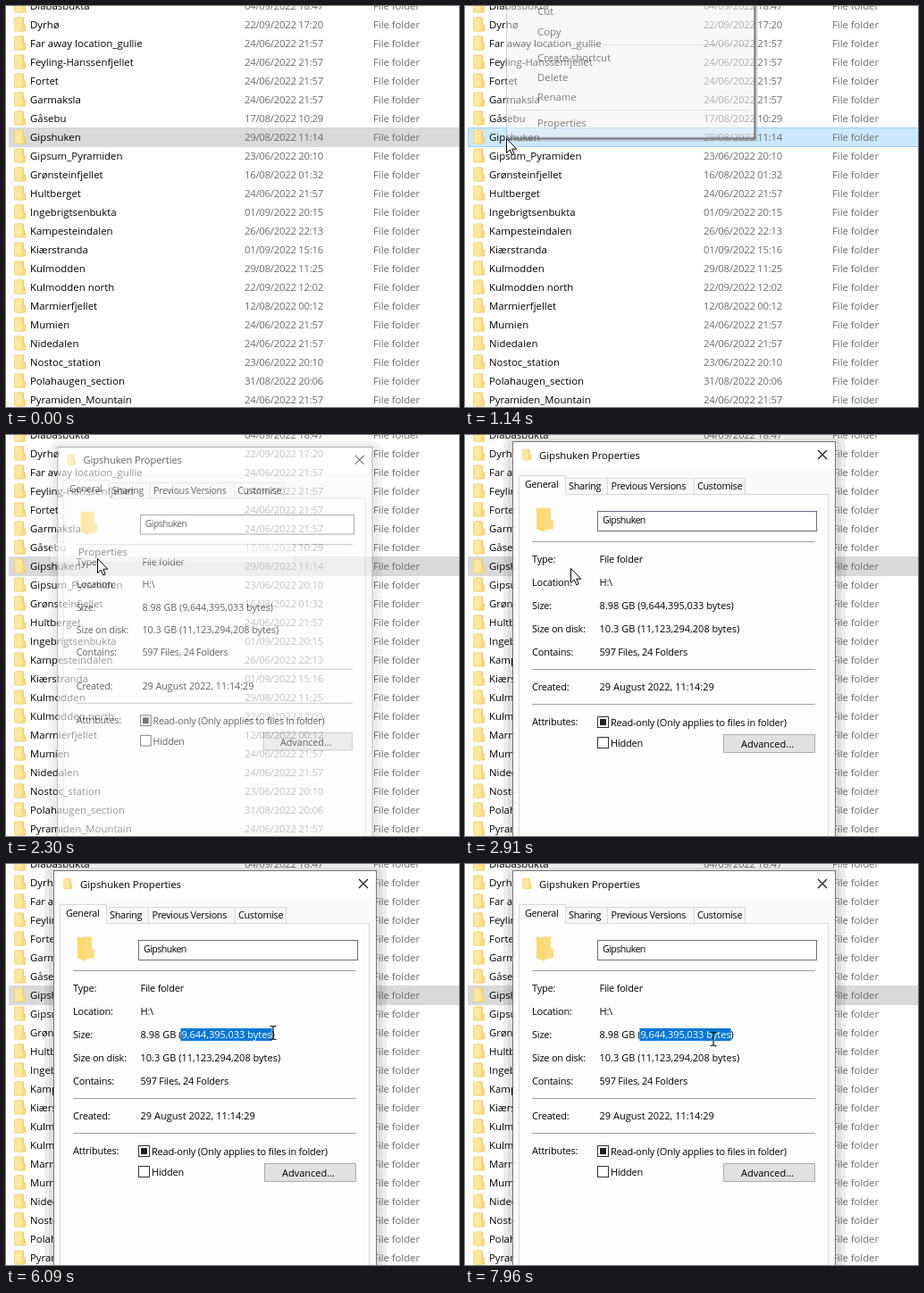
Recreate the animation shown at these times as an HTML page. Size 507 by 449 pixels, loop 8 s.

```html
<!DOCTYPE html>
<html lang="en">
<head>
<meta charset="utf-8">
<title>Folder properties</title>
<style>
html, body { margin: 0; width: 100%; height: 100%; overflow: hidden; background: #fff; }
svg { display: block; width: 507px; height: 449px; font: 11.4px "Open Sans", "Noto Sans", sans-serif; }
text { white-space: pre; }
.date { fill: #6d6d6d; letter-spacing: -.28px; }
.kind { fill: #6d6d6d; letter-spacing: -.06px; }
.title { letter-spacing: -.08px; }
.num { font-size: 11px; }
.word { font-size: 11px; letter-spacing: -.22px; }
.tab { font-size: 10.8px; letter-spacing: -.3px; }
.field { font-size: 10.6px; letter-spacing: -.55px; }
</style>
</head>
<body>
<svg id="stage" viewBox="0 0 507 449">
  <defs>
    <g id="folder">
      <path d="M13-7.500H19.500V-.5L21.500.5V7.500H13Z" fill="#fbdc83" stroke="#ecc75f" stroke-width=".8"/>
      <path d="M9.500-7.500H18.500V7.500H9.500Z" fill="#ffe79f" stroke="#f0d078" stroke-width=".8"/>
    </g>
    <clipPath id="picked"><rect id="pickClip" x="195.500" y="183" width="0" height="16"/></clipPath>
  </defs>
  <rect id="hover" x="3" width="510" height="21" fill="#e5f3ff"/>
  <rect id="chosen" x="3.5" y="136.5" width="510" height="21"/>
  <g id="list"></g>

  <g id="menuShadow" fill="none" stroke="#777" stroke-width="2">
    <path d="M324.5-5V148.5H50"/>
    <path d="M326.5-5V150.5H52" stroke="#aaa" opacity=".5"/>
  </g>
  <g id="menu">
    <rect x="46.5" y="-10" width="277" height="157" fill="#f2f2f2" stroke="#a0a0a0"/>
    <path d="M52 43.5H318M52 116.5H318" stroke="#c4c4c4"/>
  </g>

  <g id="dialog">
    <rect x="43" y="0" width="383" height="540" rx="12" opacity=".07"/>
    <rect x="48" y="4" width="373" height="540" rx="8" opacity=".06"/>
    <rect x="53.5" y="7.5" width="361" height="520" fill="#fff" stroke="#777"/>
    <rect x="54" y="37" width="360" height="480" fill="#fafafa"/>
    <g fill="#f7f7f7" stroke="#d9d9d9">
      <path d="M112.5 66V48.5H159.5V66M159.5 48.5H256.5V66M256.5 48.5H313.5V66"/>
      <path d="M60.5 500V45.5H112.5V66.5H406.5V500" fill="#fdfdfd"/>
    </g>
    <use href="#folder" transform="translate(57.500 22) scale(.76)"/>
    <path d="M395 17l10 10M405 17l-10 10" stroke="#111" stroke-width="1.1"/>
    <path d="M84 81.500H96V94L99 96V105L89 107Z" fill="#fbdd86"/>
    <path d="M80 81L89 85V109L80 105Z" fill="#ffd970"/>
    <rect x="148.500" y="85.5" width="245" height="22" fill="#fff" stroke="#6f6f7a"/>
    <path d="M75 119.500H392M75 262.500H392M75 301.500H392" stroke="#a0a0a0"/>
    <g fill="#fff" stroke="#333">
      <rect x="148.500" y="315.500" width="12" height="12"/>
      <rect x="148.500" y="338.500" width="12" height="12"/>
    </g>
    <rect x="151" y="318" width="7" height="7" fill="#222"/>
    <rect x="289.500" y="335.500" width="102" height="20" fill="#e1e1e1" stroke="#adadad"/>
  </g>

  <rect id="pick" x="195.500" y="184" height="14" fill="#0078d7"/>
  <g id="pickText" clip-path="url(#picked)" fill="#fff"></g>
  <g id="item"><rect x="50" y="121" width="271" height="21" fill="#fff"/></g>

  <circle id="ring" r="10" fill="none" stroke="#111" stroke-width="1.3"/>
  <path id="arrow" d="M.5.5V16.5L4.200 13 6.800 18.800 9.200 17.800 6.700 12.200H11.800Z" fill="#fff" stroke="#000"/>
  <path id="beam" d="M-3.500-7.500H-1.200L0-6.500 1.200-7.500H3.500M0-6.500V6.500M-3.500 7.500H-1.200L0 6.500 1.200 7.500H3.500" fill="none" stroke="#111" stroke-width="1.2"/>
</svg>
<script>
const $ = id => document.getElementById(id);

function add(parent, tag, attrs, content) {
  const el = document.createElementNS('http://www.w3.org/2000/svg', tag);
  for (const key in attrs) el.setAttribute(key, attrs[key]);
  if (content) el.textContent = content;
  return $(parent).appendChild(el);
}
// y is the middle of the line of text
const write = (parent, x, y, content, cls = '') =>
  add(parent, 'text', { x, y: y + 4.2, class: cls }, content);

const rows = `Diabasbukta|04/09/2022 18:47
Dyrhø|22/09/2022 17:20
Far away location_gullie|24/06/2022 21:57
Feyling-Hanssenfjellet|24/06/2022 21:57
Fortet|24/06/2022 21:57
Garmaksla|24/06/2022 21:57
Gåsebu|17/08/2022 10:29
Gipshuken|29/08/2022 11:14
Gipsum_Pyramiden|23/06/2022 20:10
Grønsteinfjellet|16/08/2022 01:32
Hultberget|24/06/2022 21:57
Ingebrigtsenbukta|01/09/2022 20:15
Kampesteindalen|26/06/2022 22:13
Kiærstranda|01/09/2022 15:16
Kulmodden|29/08/2022 11:25
Kulmodden north|22/09/2022 12:02
Marmierfjellet|12/08/2022 00:12
Mumien|24/06/2022 21:57
Nidedalen|24/06/2022 21:57
Nostoc_station|23/06/2022 20:10
Polahaugen_section|31/08/2022 20:06
Pyramiden_Mountain|24/06/2022 21:57`.split('\n');

rows.forEach((row, i) => {
  const y = 21 * i - 0.5;
  const [name, date] = row.split('|');
  add('list', 'use', { href: '#folder', y });
  write('list', 27, y, name);
  write('list', 267, y, date, 'date');
  write('list', 411, y, 'File folder', 'kind');
});

[['Cut', 6], ['Copy', 29], ['Create shortcut', 58], ['Delete', 80], ['Rename', 102], ['Properties', 131]]
  .forEach(([label, y]) => write('menu', 81, y, label));
write('item', 81, 131, 'Properties');

write('dialog', 83, 22.500, 'Gipshuken Properties', 'title');
[['General', 67, 55], ['Sharing', 116, 57], ['Previous Versions', 163.500, 57], ['Customise', 260, 57]]
  .forEach(([label, x, y]) => write('dialog', x, y, label, 'tab'));
write('dialog', 154, 95, 'Gipshuken', 'field');
[['Type:', 139, 'File folder', 'word'],
 ['Location:', 165, 'H:\\', 'word'],
 ['Size:', 191, '8.98 GB (9,644,395,033 bytes)', 'num'],
 ['Size on disk:', 217, '10.3 GB (11,123,294,208 bytes)', 'num'],
 ['Contains:', 243, '597 Files, 24 Folders', 'word'],
 ['Created:', 282, '29 August 2022, 11:14:29', 'num'],
 ['Attributes:', 321, '', 'word']
].forEach(([label, y, value, cls]) => {
  write('dialog', 75, y, label, 'word');
  write('dialog', 150.500, y, value, cls);
});
write('dialog', 163, 322, 'Read-only (Only applies to files in folder)', 'word');
write('dialog', 163, 345, 'Hidden', 'word');
write('dialog', 309, 346, 'Advanced...', 'num');
const sizeText = write('pickText', 150.500, 191, '8.98 GB (9,644,395,033 bytes)', 'num');

// pointer: time, x, y
const path = [
  [240, 150, 452], [480, 92, 300], [700, 46, 148], [1250, 46, 148],
  [1480, 76, 141], [1740, 102, 138], [2700, 102, 138], [2910, 118, 149],
  [3200, 154, 180], [3510, 184, 193], [3800, 212, 194], [4220, 195, 193],
  [4510, 195, 193], [4630, 212, 195], [5000, 260, 194], [5330, 294, 192],
  [5430, 299, 189], [6110, 299, 189], [6640, 193, 196], [6880, 200, 196],
  [7380, 295, 194], [7740, 239, 195], [7960, 278, 196]
];
const presses = [[960, 1080], [1810, 1930], [4420, 5720]];

const within = (t, a, b) => t >= a && t < b;
const ramp = (t, a, b) => Math.min(1, Math.max(0, (t - a) / (b - a)));
const show = (id, on) => $(id).setAttribute('visibility', on ? 'visible' : 'hidden');
const fade = (id, amount) => $(id).setAttribute('opacity', amount);
const place = (id, x, y) => $(id).setAttribute('transform', `translate(${x} ${y})`);

function pointer(t) {
  let i = 1;
  while (i < path.length - 1 && path[i][0] < t) i++;
  const [t0, x0, y0] = path[i - 1], [t1, x1, y1] = path[i];
  const k = ramp(t, t0, t1);
  return [Math.round(x0 + (x1 - x0) * k), Math.round(y0 + (y1 - y0) * k)];
}

// selection edge, snapped to whole characters
function selectedWidth(x) {
  let width = 0;
  for (let n = 10; n <= 28; n++) {
    const end = sizeText.getSubStringLength(0, n) - 45;
    if (end <= x - 193) width = end;
  }
  return Math.max(0, width);
}

function draw(t) {
  const [x, y] = pointer(t);
  const isBeam = t > 3180;
  show('arrow', t >= 240 && !isBeam);
  show('beam', isBeam);
  place('arrow', x, y);
  place('beam', x, y);
  show('ring', presses.some(([a, b]) => within(t, a, b)));
  place('ring', x, y);

  show('hover', within(t, 240, 700) && y > 157);
  $('hover').setAttribute('y', 136 + 21 * Math.floor((y - 136) / 21));
  const blue = within(t, 690, 2000);
  $('chosen').setAttribute('fill', blue ? '#cce8ff' : '#d9d9d9');
  $('chosen').setAttribute('stroke', blue ? '#99d1ff' : '#d9d9d9');

  const menuOn = within(t, 1080, 1950);
  show('menu', menuOn);
  show('menuShadow', menuOn);
  fade('menu', 0.2 + 0.8 * ramp(t, 1080, 1240));
  show('item', within(t, 1460, 2500));
  fade('item', 1 - ramp(t, 2050, 2500));

  const open = ramp(t, 2200, 2400);
  const scale = 0.95 + 0.05 * open;
  show('dialog', open > 0);
  fade('dialog', open < 1 ? 0.2 + 0.8 * open : 1);
  $('dialog').setAttribute('transform',
    `translate(${228 * (1 - scale)} ${250 * (1 - scale)}) scale(${scale})`);

  const width = t < 4560 ? 0 : selectedWidth(t < 5720 ? x : 300);
  $('pick').setAttribute('width', width);
  $('pickClip').setAttribute('width', width);
}

function tick() {
  draw(performance.now() % 8000);
  requestAnimationFrame(tick);
}
tick();
</script>
</body>
</html>
```
